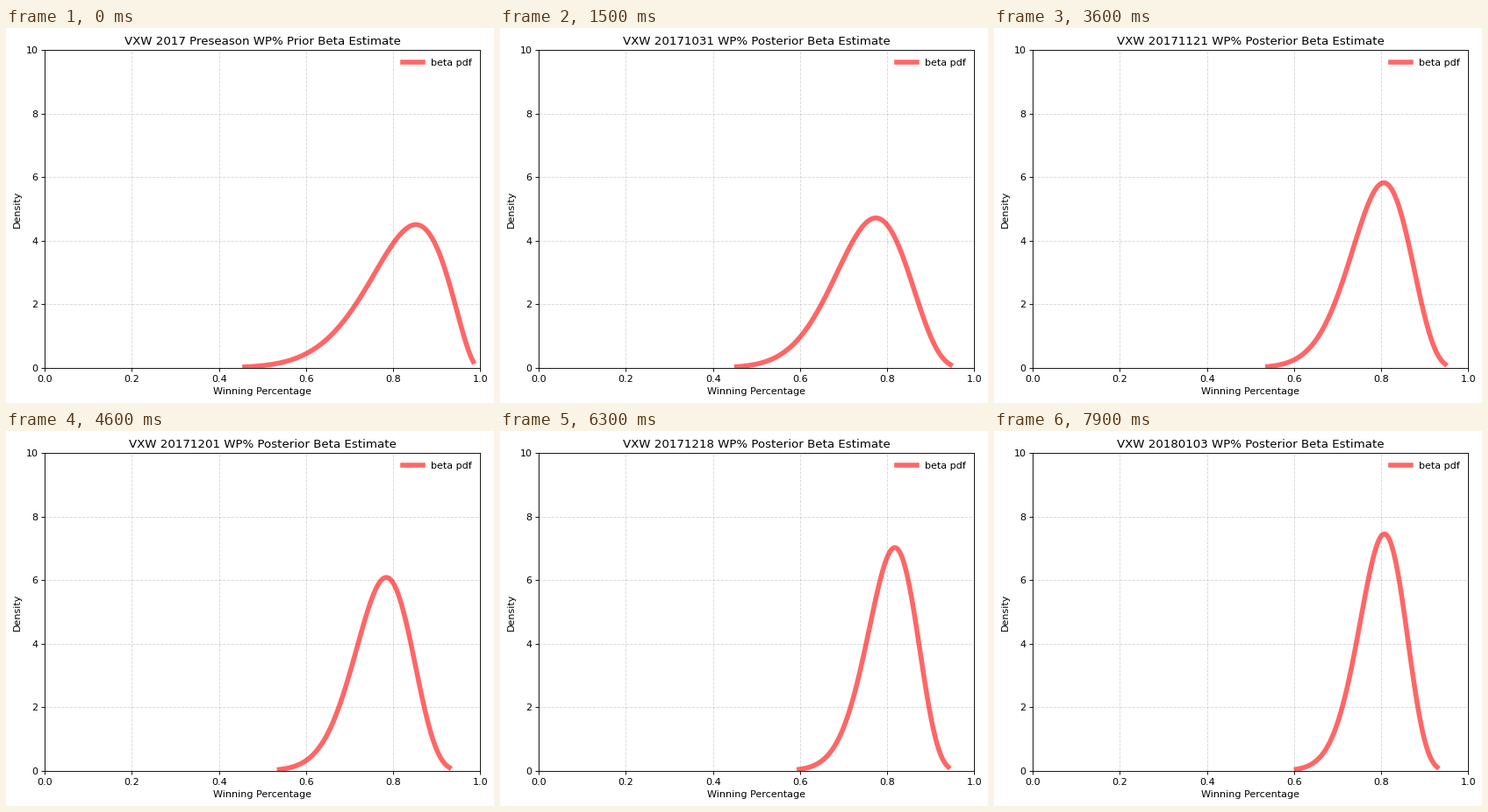
Write a matplotlib script that moves like this. It is 556 by 428 pixels and loops after 8 s.

```python
import numpy as np
import matplotlib.pyplot as plt
from matplotlib.animation import FuncAnimation

W, H, DPI = 556, 428, 80
FRAMES, STEP_MS = 80, 100
TEAM = "VXW"
START = np.datetime64("2017-10-16")

# Prior shape parameters: pseudo wins and losses
PRIOR_A, PRIOR_B = 14.0, 3.25

# A game about every second day, paced through a few key games
GAMES = np.arange(1, 39)
GAME_DAYS = np.ceil(np.interp(GAMES, [1, 12, 18, 27, 30, 37, 38],
                              [1, 23, 37, 53, 63, 75, 79]))
LOST = np.isin(GAMES, [1, 3, 7, 15, 18, 21, 33, 36])

GRID = np.linspace(0, 1, 20001)


def beta_curve(a, b):
    """Beta density between its 0.1% and 99.9% quantiles."""
    pdf = GRID ** (a - 1) * (1 - GRID) ** (b - 1)
    cdf = np.concatenate([[0], np.cumsum((pdf[1:] + pdf[:-1]) / 2)])
    pdf /= cdf[-1] * GRID[1]
    lo, hi = np.interp([0.001, 0.999], cdf / cdf[-1], GRID)
    x = np.linspace(lo, hi, 100)
    return x, np.interp(x, GRID, pdf)


def title_for(day):
    if day == 0:
        return f"{TEAM} 2017 Preseason WP% Prior Beta Estimate"
    date = str(START + day).replace("-", "")
    return f"{TEAM} {date} WP% Posterior Beta Estimate"


plt.rcParams["font.family"] = "DejaVu Sans"
fig = plt.figure(figsize=(W / DPI, H / DPI), dpi=DPI, facecolor="white")
ax = fig.add_axes([44.25 / W, 40.22 / H, 496 / W, 362.4 / H])
ax.set(xlim=(0, 1), ylim=(0, 10),
       xlabel="Winning Percentage", ylabel="Density")
ax.grid(linestyle="--", alpha=0.5)
line, = ax.plot([], [], "r-", lw=5, alpha=0.6, label="beta pdf")
ax.legend(loc="upper right", frameon=False)
title = ax.set_title(title_for(0))


def update(day):
    played = GAME_DAYS <= day
    wins, losses = np.sum(played & ~LOST), np.sum(played & LOST)
    line.set_data(*beta_curve(PRIOR_A + wins, PRIOR_B + losses))
    title.set_text(title_for(day))
    return line, title


anim = FuncAnimation(fig, update, frames=FRAMES, interval=STEP_MS,
                     repeat=True, repeat_delay=0, blit=False)
plt.show()
```
